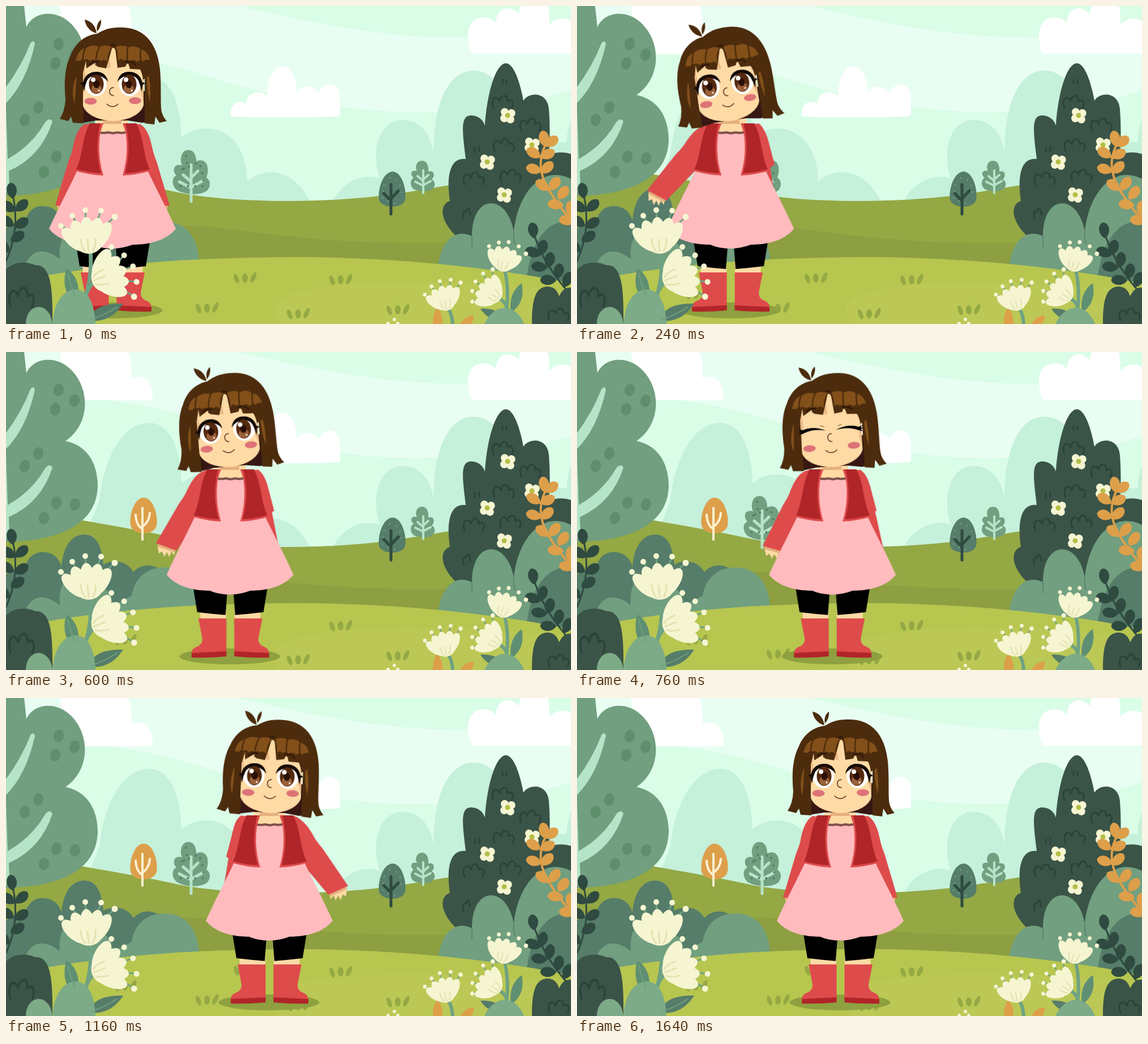
These frames come from a looping animation (998x561 px, 1800 ms). An HTML page without scripts:

```html
<!DOCTYPE html>
<html lang="en">
<head>
<meta charset="utf-8">
<title>Girl in the garden</title>
<style>
html, body { margin: 0; height: 100%; overflow: hidden; background: #dafde8; }
svg { display: block; width: 100vw; height: 100vh; }
.far { fill: #c5f0da; }
.sage { fill: #719f7f; }
.teal { fill: #557d69; }
.pine { fill: #3b5448; }
.ink { fill: #2f4a40; }
.olive { fill: #94a844; }
.amber { fill: #dd9f4a; }
.mint { fill: #b5e4c9; }
.cream { fill: #f6f5d2; }
.skin { fill: #fedaa5; }
.red { fill: #de4b4b; }
.wine { fill: #b02528; }
.hair { fill: #4c2c0d; }
.glow { fill: #83501a; }
.line { fill: none; stroke-linecap: round; stroke-linejoin: round; }

.girl, .arm, .head, .open, .shut { animation: 1.8s infinite; }
.girl { animation-name: walk; }
.arm { animation-name: swing; }
.head { animation-name: nod; transform-origin: 188px 200px; }
/* An arm swings less when it tucks in towards the body */
.left { transform-origin: 133px 220px; --first: 1; --second: .4; }
.right { transform-origin: 243px 220px; --first: .4; --second: 1; }
.open { animation-name: open; animation-timing-function: step-end; }
.shut { animation-name: shut; animation-timing-function: step-end; }

/* Poses advance at 25 per second */
@keyframes walk {
  0% { transform: translateX(0); animation-timing-function: steps(20); }
  44.4444%, 100% { transform: translateX(277px); }
}
@keyframes swing {
  0% { transform: rotate(0deg); animation-timing-function: steps(6); }
  13.3333% { transform: rotate(calc(22deg * var(--first))); animation-timing-function: steps(14); }
  44.4444% { transform: rotate(calc(9deg * var(--first))); animation-timing-function: steps(7); }
  60% { transform: rotate(calc(-25deg * var(--second))); animation-timing-function: steps(7); }
  75.5556%, 100% { transform: rotate(0deg); }
}
@keyframes nod {
  0% { transform: rotate(0deg); animation-timing-function: steps(6); }
  13.3333% { transform: rotate(-8.4deg); animation-timing-function: steps(14); }
  44.4444% { transform: rotate(-3.2deg); animation-timing-function: steps(7); }
  60% { transform: rotate(3deg); animation-timing-function: steps(7); }
  75.5556%, 100% { transform: rotate(0deg); }
}
@keyframes open { 0%, 26.6667%, 46.6667%, 100% { opacity: 1; } 20%, 40% { opacity: 0; } }
@keyframes shut { 0%, 26.6667%, 46.6667%, 100% { opacity: 0; } 20%, 40% { opacity: 1; } }
</style>
</head>
<body>
<svg viewBox="0 0 998 561" preserveAspectRatio="none">
<defs>
  <g id="grass" class="olive">
    <ellipse rx="4" ry="9" transform="translate(-15 1) rotate(-20)"/>
    <ellipse rx="5" ry="8"/>
    <ellipse rx="4" ry="10" transform="translate(15 -1) rotate(25)"/>
  </g>
  <ellipse id="spot" rx="9" ry="11" fill="#5f8e6d" transform="rotate(15)"/>
  <path id="leaf" d="M0 0C-13-6-14-23-5-28C6-29 13-12 0 0Z"/>
  <path id="curl" class="line" stroke="#2c4339" stroke-width="3" d="M-15 10C-22-8-8-14-4-2C-2-14 10-16 10-2C18-8 22 2 17 10"/>
  <g id="blossom" transform="rotate(10)">
    <g class="cream"><circle cx="-6" cy="-5" r="7"/><circle cx="6" cy="-5" r="7"/><circle cx="-5" cy="6" r="7"/><circle cx="6" cy="6" r="7"/></g>
    <circle r="4.5" fill="#b3bf45"/>
  </g>
  <ellipse id="petal" cy="-37" rx="13" ry="28"/>
  <g id="flower">
    <path class="line" stroke="#6fa283" stroke-width="3" d="M-51-49L-5-25L-31-67M-5-25L-8-77M0-25L20-76M0-25L44-65"/>
    <g class="cream">
      <circle cx="-51" cy="-49" r="5"/><circle cx="-31" cy="-67" r="5"/><circle cx="-8" cy="-77" r="5"/><circle cx="20" cy="-76" r="5"/><circle cx="44" cy="-65" r="5.5"/>
      <use href="#petal" transform="rotate(-48)"/><use href="#petal" transform="rotate(-27)"/><use href="#petal" transform="rotate(-6)"/><use href="#petal" transform="rotate(14)"/><use href="#petal" transform="rotate(33)"/>
      <ellipse cx="-2" cy="-22" rx="25" ry="22"/>
    </g>
    <path class="line" stroke="#e4e2b0" stroke-width="3" d="M-16-26Q-15-12-8-4M-4-25L-2-4M10-27Q11-14 5-5"/>
  </g>
  <g id="arm">
    <path class="skin" transform="rotate(-20 107 357)" d="M92 350L93 364L99 361L102 371L107 363L111 372L115 363L120 370L123 354Z"/>
    <path fill="#e4b07d" d="M90 350L124 354L123 360L91 357Z"/>
    <path class="red" d="M140 208C128 214 122 230 118 250C116 262 111 270 108 281L87 352L125 356L152 290L160 215Z"/>
  </g>
  <g id="leg">
    <path class="skin" d="M135 450H181V474H136Z"/>
    <path d="M122 410H184L180 464Q155 462 130 459Z"/>
    <path class="red" d="M132 470H181.500V533H120Q120 523 129 520Q140 516 139 505Z"/>
    <path class="wine" d="M120 531L181.500 528V537Q150 540 120 539Z"/>
  </g>
  <g id="jacket">
    <path class="red" d="M172 207H150C132 211 126 225 122 242L112 280L128 290L150 270Z"/>
    <path class="red" d="M149 207H170C162 238 163 270 172 299Q148 298 123 291C136 268 134 232 149 207Z"/>
    <path class="wine" d="M148 207H167C159 238 160 268 168 295Q146 294 124 288C136 264 134 232 148 207Z"/>
  </g>
  <g id="eye">
    <ellipse cx="158.500" cy="138" rx="19" ry="21" fill="#fff"/>
    <path fill="#140a08" d="M137 151C132 129 143 116 160 116C172 116 179 124 180 134C171 120 149 119 143 132Q139 141 138 151L136 139L131 137L136 134Z"/>
    <ellipse cx="159.500" cy="138" rx="13" ry="17" fill="#54290f"/>
    <ellipse cx="160" cy="146" rx="9" ry="8" fill="#9b613a"/>
    <ellipse cx="160" cy="138" rx="5.500" ry="7" fill="#2a1009"/>
  </g>
  <path id="lid" d="M131 138L136 139L133 143L140 141Q158 133 180 138Q158 128 139 135L132 132L136 136Z"/>
</defs>

<!-- Sky -->
<path fill="#e9fef3" d="M0 0H410C560 36 690 58 815 56Q920 53 998 36V148C930 170 850 187 720 187C610 186 510 167 410 140C310 110 260 90 100 76H0Z"/>
<g fill="#fff">
  <path d="M95 0H216Q222 10 222 47C240 36 260 50 259 82Q258 85 250 85H110Z"/>
  <path d="M397 191C396 171 411 165 424 173C426 152 447 145 461 159C463 91 511 90 514 152C523 138 544 140 552 154C562 130 591 134 590 165V190Q590 195 580 195Q480 198 401 195Q397 195 397 191Z"/>
  <path d="M822 82C809 49 817 18 846 20Q859 21 865 31C866 1 892-3 905 14L909 0H957Q960 10 960 33C972 20 989 20 998 27V84H828Q823 84 822 82Z"/>
</g>
<g class="far">
  <path d="M130 350L165 262C172 190 205 125 253 125C289 125 309 170 310 232C340 203 424 205 426 310C450 286 505 280 537 345V360H130Z"/>
  <path d="M577 345C597 303 640 295 660 305C643 250 662 201 700 201C730 201 750 223 755 259C755 170 782 114 826 114C865 114 895 160 900 240H990Q992 215 998 200V360H577Z"/>
</g>

<!-- Fields -->
<path class="olive" d="M0 275L135 297C205 309 260 319 300 328C380 346 560 352 705 329L790 315L998 300V561H0Z"/>
<path fill="#8d9f41" d="M230 385Q330 385 400 394C560 416 640 419 800 418V500H230Z"/>
<g>
  <path class="amber" d="M243 257C226 257 217 290 220 306C224 324 262 325 266 306C269 288 260 257 243 257Z"/>
  <path class="line" stroke="#fdf0cf" stroke-width="4" d="M241 331V275M241 312Q230 306 229 287M241 308Q253 300 254 284"/>
  <path class="sage" d="M322 254C310 254 306 270 311 281C296 277 293 291 301 299C291 303 293 320 304 326C320 334 346 334 356 325C363 316 360 306 354 303C360 288 356 266 336 274C336 263 332 254 322 254Z"/>
  <path class="line" stroke="#b5e4c9" stroke-width="5" d="M327 345V280M327 310L313 298M327 321L306 310M328 302L339 291M328 319L348 308"/>
  <path class="line" stroke="#557d69" stroke-width="4" stroke-dasharray="0 13" d="M318 264L320 284L307 290L341 276L346 290L350 318L304 318"/>
  <path class="sage" d="M735 273C725 273 722 284 726 291C715 288 713 298 720 303C711 309 715 323 725 325Q737 329 750 325C760 320 759 309 752 306C759 299 756 289 746 292C747 281 743 273 735 273Z"/>
  <path class="line" stroke="#b5e4c9" stroke-width="4" d="M737 330V290M737 309L727 300M737 317L723 310M737 306L746 298M737 316L750 309"/>
  <path class="teal" d="M683 292C665 293 656 325 659 342C664 358 701 358 705 342C708 325 700 293 683 292Z"/>
  <path class="line" stroke="#2f4a40" stroke-width="5" d="M680 367V315M680 344L667 330M680 340L693 326"/>
  <path class="line" stroke="#719f7f" stroke-width="3" stroke-dasharray="0 12" d="M678 303L690 307L697 318L700 340M668 315L665 340L690 350"/>
</g>

<!-- Left tree and bushes -->
<path class="sage" d="M0 0H32L36 37C50 8 88 8 110 27C150 60 150 127 105 157C141 164 161 193 162 234C162 295 110 333 0 335Z"/>
<path class="mint" d="M0 143Q28 105 43 66Q49 58 51 67Q36 135 0 171ZM0 182L3 270Q46 246 70 204Q78 196 82 204Q62 266 5 291L6 318L0 330Z"/>
<use href="#spot" x="93" y="67"/><use href="#spot" x="121" y="86"/><use href="#spot" x="87" y="101"/><use href="#spot" x="57" y="179"/>
<use href="#spot" x="33" y="201"/><use href="#spot" x="89" y="266"/><use href="#spot" x="122" y="269"/><use href="#spot" x="67" y="293"/>
<path class="teal" d="M0 500V392Q14 380 33 382C38 362 50 353 64 353C83 353 93 363 98 378C102 335 121 322 138 322C160 322 169 342 172 375C192 364 215 370 225 388C240 372 262 374 275 386V480H0Z"/>
<path class="sage" d="M28 500C28 420 70 425 95 447C92 405 110 392 130 397C165 401 185 420 190 447L222 430C228 395 252 379 283 380C318 382 339 408 341 450V500Z"/>

<!-- Right shrubs -->
<path class="pine" d="M812 420C764 385 764 350 784 344C779 310 780 266 812 270C806 220 802 193 822 193Q840 194 846 211C850 150 866 101 883 101C900 101 911 150 914 167C922 152 956 149 959 182Q962 222 959 262Q980 255 998 261V440H830Z"/>
<use href="#curl" x="876" y="170"/><use href="#curl" x="925" y="210"/><use href="#curl" x="878" y="246"/><use href="#curl" x="825" y="305"/><use href="#curl" x="890" y="300"/>
<path class="line" stroke="#2c4339" stroke-width="3" d="M877 136V130M884 137V131M828 257V249M836 256V248M808 375Q805 361 812 363Q818 350 820 368"/>
<use href="#blossom" x="886" y="193"/><use href="#blossom" x="850" y="275"/><use href="#blossom" x="929" y="245"/><use href="#blossom" x="880" y="333"/>
<path class="sage" d="M762 480C762 420 790 390 823 406C823 330 885 330 897 398C905 325 950 280 998 305V520H762Z"/>
<path class="teal" d="M918 500C922 420 955 374 998 381V520Z"/>
<path class="line" stroke="#557d69" stroke-width="1.500" d="M823 406V425M897 398Q896 412 899 420"/>

<!-- Front lawn -->
<path fill="#b7c64f" d="M0 490C150 455 330 443 520 443C700 444 870 463 998 489V561H0Z"/>
<path fill="#bbc855" d="M474 540C468 508 540 487 720 487Q870 487 998 505V561H482Z"/>
<use href="#grass" x="422" y="480"/><use href="#grass" x="591" y="483"/><use href="#grass" x="355" y="533"/>
<use href="#grass" x="516" y="543"/><use href="#grass" x="692" y="536"/><use href="#grass" x="210" y="508"/>

<!-- Girl -->
<g class="girl">
  <ellipse cx="187.500" cy="537" rx="89" ry="14" fill="#8ea03f"/>
  <use href="#leg"/><use href="#leg" transform="translate(377) scale(-1 1)"/>
  <g class="arm left"><use href="#arm"/></g>
  <g class="arm right"><use href="#arm" transform="translate(376) scale(-1 1)"/></g>
  <path class="skin" d="M160 195H216V230H160Z"/>
  <path fill="#e4b07d" d="M174 196H204V208H170Z"/>
  <path fill="#ffbbbe" d="M162 225H214L250 290C265 322 284 357 300 393C284 413 255 421 224 421Q205 428 188 428Q168 428 152 421C121 421 92 413 76 393C92 357 111 322 126 290Z"/>
  <path class="line" stroke="#80504a" stroke-width="4" d="M167 223.500L174 224L181 223L189 224.500L197 223L204 224L211 223"/>
  <use href="#jacket"/><use href="#jacket" transform="translate(378) scale(-1 1)"/>
  <g class="head">
    <path fill="#371713" d="M125 150H258V203L241 206L215 202L160 202L134 206Z"/>
    <path class="hair" d="M161 49C176 38 200 35 222 40C252 48 268 74 272 112C275 145 272 172 275 187Q278 197 284 203L271 206L264 195L262 209L245 207V120H137V207L118 206L115 195L110 203L95 199Q104 186 105 165C102 135 104 105 115 85C123 65 140 51 161 49Z"/>
    <path class="glow" d="M124 123Q114 150 121 172Q124 145 124 123ZM249 110Q258 140 254 170Q247 140 249 110Z"/>
    <path class="skin" d="M136 92H181L187 72H194L198 92H243V175C239 190 218 202 190 203C162 202 141 191 136 176Z"/>
    <path fill="#eab985" d="M137 92L141 130L136 160ZM181 80L185 109H179ZM243 120L238 150L243 170Z"/>
    <path class="hair" d="M190 66C150 62 126 85 125 123L133 130C135 119 138 112 141 97L142 110L158 100L161 107L177 110Q183 90 187 75Q193 70 194 84L197 109L211 107L215 98L219 111L237 112Q241 120 242 130L252 124C253 85 228 64 190 66Z"/>
    <path class="glow" d="M123 96Q128 76 140 75Q152 67 165 72Q176 67 187 72Q179 82 179 99Q174 92 168 97Q164 92 159 97Q154 92 148 97Q142 91 139 95Q133 92 131 97ZM194 72Q206 67 216 73Q230 68 238 77Q250 78 254 95Q246 93 242 98Q237 92 232 99Q225 92 219 97Q212 93 207 96Q202 90 198 97Q198 82 194 72Z"/>
    <path class="line" stroke="#4c2c0d" stroke-width="2.500" d="M140 75Q135 85 136 99M165 72Q158 85 159 104M215 73Q213 85 215 101M238 77Q236 88 240 108M185 70Q190 65 194 71"/>
    <path class="line" stroke="#281309" stroke-width="2" d="M148 103Q154 96 164 99M212 99Q222 96 229 104M185 70Q189 66 193 71"/>
    <g class="open">
      <use href="#eye"/><use href="#eye" transform="translate(377) scale(-1 1)"/>
      <g fill="#fff"><circle cx="154" cy="130" r="4"/><circle cx="212" cy="130" r="4"/><circle cx="164" cy="149" r="1.500"/><circle cx="222" cy="149" r="1.500"/></g>
    </g>
    <g class="shut">
      <use href="#lid"/><use href="#lid" transform="translate(378) scale(-1 1)"/>
      <path class="line" stroke="#6b3f22" d="M171 129L177 131M202 131L208 129"/>
    </g>
    <ellipse cx="149.500" cy="168" rx="11" ry="6" fill="#dd7377"/>
    <ellipse cx="228" cy="167" rx="11" ry="6" fill="#dd7377"/>
    <path class="line" stroke="#55301a" stroke-width="1.500" d="M190 144C181 143 180 158 190 158M178 173Q188 182 198 173"/>
    <path class="hair" d="M160 48C154 47 141 40 139 24Q157 28 160 48ZM161 45C159 36 162 28 168 24Q169 36 161 45Z"/>
  </g>
</g>

<!-- Left foreground -->
<path class="line" stroke="#2f4a40" stroke-width="3" d="M0 450Q27 390 10 325"/>
<g class="ink">
  <use href="#leaf" transform="translate(12 340)"/><use href="#leaf" transform="translate(17 362) rotate(55)"/><use href="#leaf" transform="translate(16 362) rotate(-50)"/>
  <use href="#leaf" transform="translate(15 391) rotate(65)"/><use href="#leaf" transform="translate(14 388) rotate(-50)"/>
  <use href="#leaf" transform="translate(8 415) rotate(65)"/><use href="#leaf" transform="translate(6 434) rotate(-40)"/>
</g>
<path class="pine" d="M0 465C15 448 42 452 51 457C78 456 83 490 82 561H0Z"/>
<use href="#curl" transform="translate(26 515) scale(1.200 1.500)"/>
<path class="line" stroke="#6fa283" stroke-width="7" d="M149 430Q153 480 138 520M160 484Q143 495 138 520"/>
<path fill="#5f8f72" d="M107 463C126 475 133 500 124 520C104 515 99 485 107 463Z"/>
<path class="teal" d="M145 556C152 532 175 524 207 525C190 551 170 557 145 556Z"/>
<path fill="#7dab87" d="M82 561C85 520 103 499 125 500C148 502 157 530 158 561ZM35 561C36 522 78 520 82 561Z"/>
<path class="line" stroke="#719f7f" stroke-width="2" d="M109 472Q115 495 122 512M150 553Q175 545 196 531"/>
<use href="#flower" transform="translate(148 437)"/>
<use href="#flower" transform="translate(152 487) rotate(75)"/>

<!-- Right foreground -->
<g class="amber">
  <path class="line" stroke="#dd9f4a" stroke-width="4" d="M953 245C930 290 955 325 998 378"/>
  <use href="#leaf" transform="translate(952 248)"/><use href="#leaf" transform="translate(951 247) rotate(65)"/>
  <use href="#leaf" transform="translate(944 267) rotate(-50)"/><use href="#leaf" transform="translate(943 267) rotate(75)"/>
  <use href="#leaf" transform="translate(946 292) rotate(-65)"/><use href="#leaf" transform="translate(945 295) rotate(55)"/>
  <use href="#leaf" transform="translate(959 325) rotate(-45)"/><use href="#leaf" transform="translate(960 325) rotate(45)"/>
  <use href="#leaf" transform="translate(985 352) rotate(-75)"/><use href="#leaf" transform="translate(975 341) rotate(45)"/>
  <use href="#leaf" transform="translate(998 372) rotate(5)"/><use href="#leaf" transform="translate(1005 380) rotate(-75)"/>
</g>
<path class="line" stroke="#2f4a40" stroke-width="3" d="M932 400Q948 455 998 510"/>
<g class="ink">
  <use href="#leaf" transform="translate(933 410)"/><use href="#leaf" transform="translate(944 440) rotate(-60)"/><use href="#leaf" transform="translate(943 440) rotate(25)"/>
  <use href="#leaf" transform="translate(956 462) rotate(-75)"/><use href="#leaf" transform="translate(957 462) rotate(20)"/>
  <use href="#leaf" transform="translate(972 484) rotate(-80)"/><use href="#leaf" transform="translate(973 482) rotate(20)"/><use href="#leaf" transform="translate(986 496) rotate(30)"/>
</g>
<path class="pine" d="M929 561C929 520 934 494 958 495Q972 496 977 512Q985 495 998 497V561Z"/>
<use href="#curl" transform="translate(975 545)"/>
<path class="line" stroke="#6fa283" stroke-width="6" d="M881 465Q889 500 884 540M868 515Q884 520 886 540M782 535Q788 545 789 561"/>
<path fill="#5f8f72" d="M911 489C916 513 908 530 892 541C888 517 896 499 911 489Z"/>
<path class="teal" d="M838 534C860 532 876 541 884 555C862 556 848 550 838 534Z"/>
<path fill="#7dab87" d="M845 561C862 524 900 522 915 561Z"/>
<path class="amber" d="M754 561Q754 540 762 532Q772 545 771 561ZM803 561Q810 547 826 546Q827 555 821 561Z"/>
<use href="#flower" transform="translate(874 468) rotate(21) scale(.69)"/>
<use href="#flower" transform="translate(780 537) rotate(-9) scale(.69)"/>
<use href="#flower" transform="translate(873 518) rotate(-48) scale(.7)"/>
<g class="cream"><circle cx="675" cy="560" r="3"/><circle cx="686" cy="553" r="3"/><circle cx="692" cy="560" r="3"/></g>
</svg>
</body>
</html>
```
